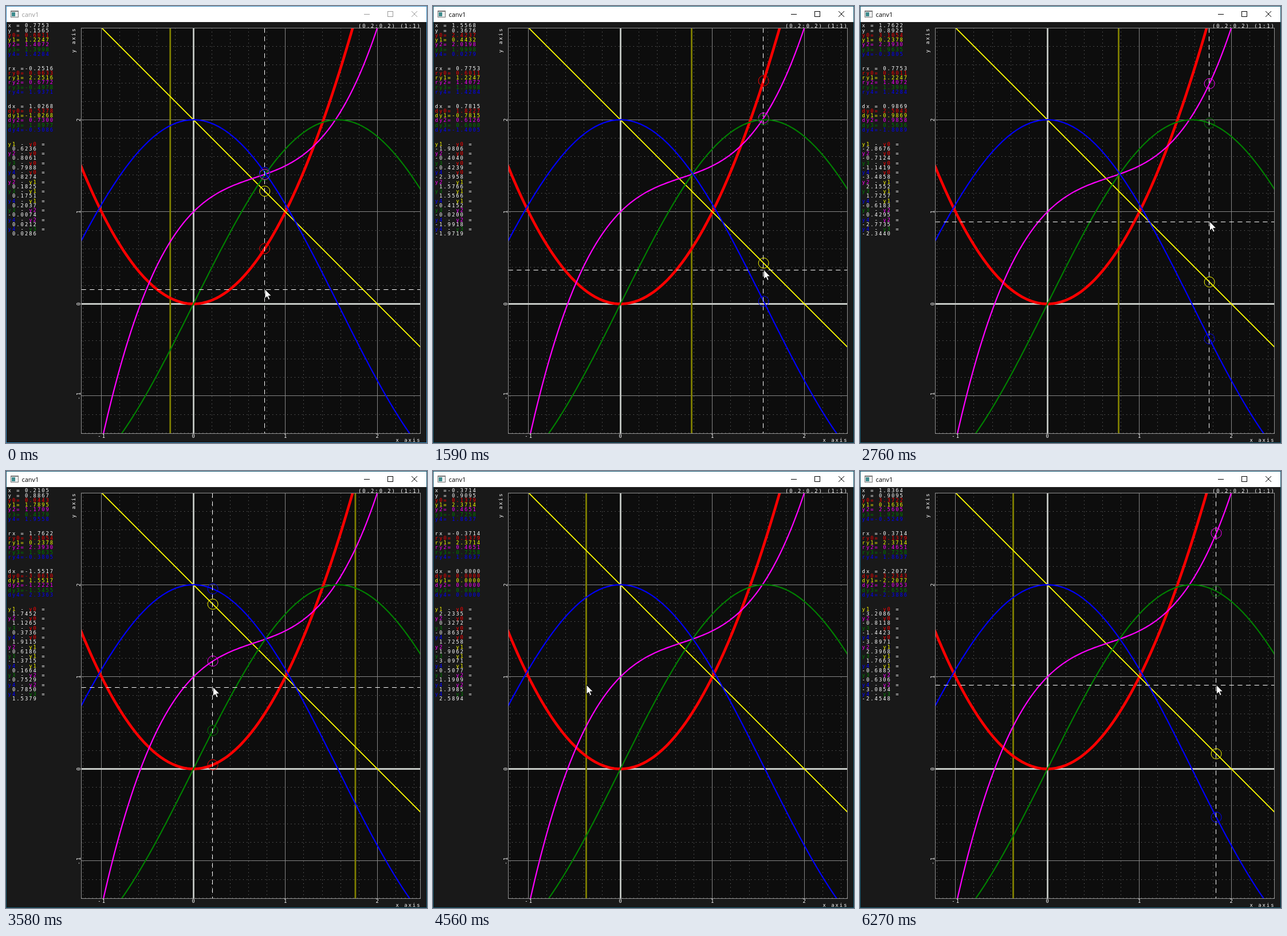
An HTML page with a canvas that plays this animation: 735x762 px, repeating every 7250 ms.

```html
<!DOCTYPE html>
<html lang="en">
<head>
<meta charset="utf-8">
<title>canv1</title>
<style>
  html, body { margin: 0; width: 100%; height: 100%; overflow: hidden; background: #191919; }
  canvas { display: block; width: 735px; height: 762px; }
</style>
</head>
<body>
<canvas id="stage" width="735" height="762"></canvas>
<script>
const ctx = document.getElementById('stage').getContext('2d');
const LOOP = 7250;
const PLOT = { left: 131.5, top: 38.5, right: 724, bottom: 745 };
const ORIGIN = { x: 327.3, y: 519.4 };
const UNIT = 160.5;
const CELL = 0.0057047;   // plot units per mouse step
const CHAR = 7.33, ROW = 8.25;

const curves = [
  { f: x => x * x, color: '#ff0000', width: 4.6 },
  { f: x => 2 - x, color: '#ffff00', width: 1.8 },
  { f: x => x ** 3 / 2 - x * x + x + 1, color: '#ff00ff', width: 2.2 },
  { f: x => 2 * Math.sin(x), color: '#008000', width: 2.2 },
  { f: x => 2 * Math.cos(x), color: '#0000ff', width: 2.2 }
];

// time, mouse column, mouse row, easing power (positive: in, negative: out)
const path = [
  [0, 136, 27, 1], [1230, 136, 27, 1],
  [1590, 273, 64, 1.2], [2100, 340, 140, -1.5], [2280, 340, 140, 1],
  [2760, 309, 156, -1], [3250, 309, 156, 1],
  [3580, 37, 155, 1.3], [4140, -65, 159, -2], [5070, -65, 159, 1],
  [5580, 41, 155, 2], [6270, 322, 159, -1.5], [LOOP, 322, 159, 1]
];
const marks = [[0, -44], [900, 136], [3120, 309], [4560, -65]];
const hidden = [[870, 1280], [3070, 3300], [4510, 5120]];
const ACTIVATE = 820;

const toX = column => column * CELL - 0.00055;
const toY = row => row * CELL + 0.0025;
const px = x => ORIGIN.x + x * UNIT;
const py = y => ORIGIN.y - y * UNIT;
const snap = v => Math.floor(v) + 0.5;
const number = v => v.toFixed(4).padStart(7);

function mouseAt(t) {
  const i = Math.max(1, path.findIndex(k => k[0] > t));
  const [t0, c0, r0] = path[i - 1], [t1, c1, r1, power] = path[i];
  const steps = Math.round((t1 - t0) / 48);
  const u = Math.floor((t - t0) / (t1 - t0) * steps + 1e-6) / steps;
  const e = power > 0 ? u ** power : 1 - (1 - u) ** -power;
  const mix = (a, b) => Math.round(a + (b - a) * e);
  return { x: toX(mix(c0, c1)), y: toY(mix(r0, r1)) };
}

function line(x0, y0, x1, y1, color, width = 1, dash = []) {
  ctx.strokeStyle = color;
  ctx.lineWidth = width;
  ctx.setLineDash(dash);
  ctx.beginPath();
  ctx.moveTo(x0, y0);
  ctx.lineTo(x1, y1);
  ctx.stroke();
  ctx.setLineDash([]);
}
const vertical = (x, ...style) => line(x, PLOT.top, x, PLOT.bottom, ...style);
const horizontal = (y, ...style) => line(PLOT.left, y, PLOT.right, y, ...style);

function mono(text, x, y, color = '#fff') {
  ctx.font = '8.8px "DejaVu Sans Mono", monospace';
  ctx.letterSpacing = (CHAR - 5.3) + 'px';
  ctx.fillStyle = color;
  ctx.fillText(text, x, y);
  ctx.letterSpacing = '0px';
}

function monoUp(text, x, y) {
  ctx.save();
  ctx.translate(x, y);
  ctx.rotate(-Math.PI / 2);
  mono(text, 0, 0);
  ctx.restore();
}

function drawWindow(active) {
  const ink = active ? '#000' : '#999';
  ctx.fillStyle = '#191919';
  ctx.fillRect(0, 0, 735, 762);
  ctx.fillStyle = '#fff';
  ctx.fillRect(0, 0, 735, 28);
  ctx.strokeStyle = active ? '#155a72' : '#3a8cc0';
  ctx.lineWidth = 1;
  ctx.strokeRect(0.5, 0.5, 734, 761);

  ctx.fillStyle = '#777';
  ctx.fillRect(8, 8, 14, 12);
  ctx.fillStyle = '#eee';
  ctx.fillRect(9, 10, 12, 9);
  ctx.fillStyle = '#3c8a8c';
  ctx.fillRect(10, 11, 6, 7);

  ctx.font = '11px "Open Sans", sans-serif';
  ctx.fillStyle = ink;
  ctx.fillText('canv1', 27.5, 18.5);

  line(625, 14.5, 635, 14.5, ink);
  ctx.strokeRect(666.5, 9.5, 9, 9);
  line(708, 9, 718, 19, ink);
  line(718, 9, 708, 19, ink);
}

function drawGrid() {
  ctx.fillStyle = '#0d0d0d';
  ctx.fillRect(PLOT.left, PLOT.top, PLOT.right - PLOT.left, PLOT.bottom - PLOT.top);
  const dots = [1, 5.42];
  for (let i = -7; i <= 14; i++) {
    const x = snap(px(i / 5)), y = snap(py(i / 5));
    if (i % 5 === 0) continue;
    if (x < PLOT.right) vertical(x, '#808080', 1, dots);
    if (y < PLOT.bottom) horizontal(y, '#808080', 1, dots);
  }
  for (const i of [-1, 1, 2]) {
    vertical(snap(px(i)), '#868686');
    horizontal(snap(py(i)), '#868686');
  }
  vertical(ORIGIN.x + 0.2, '#c4c8c4', 2.8);
  horizontal(ORIGIN.y + 0.1, '#c4c8c4', 2.8);
}

function drawCurves() {
  for (const { f, color, width } of curves) {
    ctx.strokeStyle = color;
    ctx.lineWidth = width;
    ctx.beginPath();
    for (let x = PLOT.left - 3; x <= PLOT.right + 3; x += 2) {
      ctx.lineTo(x, py(f((x - ORIGIN.x) / UNIT)));
    }
    ctx.stroke();
  }
}

function drawCrosshair({ x, y }) {
  const dash = [8.24, 6.42];
  vertical(snap(px(x) - 0.3), '#fff', 1, dash);
  horizontal(snap(py(y)), '#fff', 1, dash);
  for (const { f, color } of curves) {
    ctx.strokeStyle = color;
    ctx.lineWidth = 1;
    ctx.beginPath();
    ctx.arc(px(x), py(f(x)), 9, 0, 2 * Math.PI);
    ctx.stroke();
  }
}

function drawLabels() {
  ctx.strokeStyle = '#909090';
  ctx.lineWidth = 1;
  ctx.strokeRect(PLOT.left, PLOT.top, 592, 707);
  mono('(0.2:0.2) (1:1)', 615, 37.5);
  mono('x axis', 680.5, 760);
  monoUp('y axis', 121, 81.5);
  for (let i = -1; i <= 2; i++) {
    const half = i < 0 ? 6.5 : 2.8;
    mono(String(i), px(i) - half, 753);
    monoUp(String(i), 130, py(i) + half);
  }
}

function drawReadout(mouse, refX) {
  const put = (text, column, row, color) =>
    mono(text, 3.6 + column * CHAR, 37.3 + row * ROW, color);

  put('x =' + number(mouse.x), 0, 0);
  put('y =' + number(mouse.y), 0, 1);
  put('rx =' + number(refX), 0, 9);
  put('dx =' + number(mouse.x - refX), 0, 17);
  curves.forEach(({ f, color }, i) => {
    const now = f(mouse.x), ref = f(refX);
    put(`y${i}=` + number(now), 0, 2 + i, color);
    put(`ry${i}=` + number(ref), 0, 10 + i, color);
    put(`dy${i}=` + number(now - ref), 0, 18 + i, color);
  });

  let row = 25;
  for (let b = 0; b < curves.length; b++) {
    for (let a = b + 1; a < curves.length; a++) {
      put('y' + a, 0, row, curves[a].color);
      put('-', 3, row);
      put('y' + b, 5, row, curves[b].color);
      put('=', 8, row);
      put(number(curves[a].f(mouse.x) - curves[b].f(mouse.x)), 0, row + 1);
      row += 2;
    }
  }
}

function drawPointer({ x, y }) {
  ctx.save();
  ctx.translate(px(x) + 0.3, py(y) - 0.5);
  const arrow = new Path2D('M0 0V16.2L3.8 12.8L6.3 18.5L8.8 17.4L6.3 11.8H11.4Z');
  ctx.fillStyle = '#fff';
  ctx.strokeStyle = '#000';
  ctx.lineWidth = 0.9;
  ctx.fill(arrow);
  ctx.stroke(arrow);
  ctx.restore();
}

function draw(t) {
  const mouse = mouseAt(t);
  const refX = toX(marks.filter(m => m[0] <= t).pop()[1]);
  const crosshair = !hidden.some(([from, to]) => t >= from && t < to);

  drawWindow(t >= ACTIVATE);
  ctx.save();
  ctx.beginPath();
  ctx.rect(PLOT.left, PLOT.top, PLOT.right - PLOT.left, PLOT.bottom - PLOT.top);
  ctx.clip();
  drawGrid();
  vertical(px(refX) - 0.2, '#808000', 2.8);
  drawCurves();
  if (crosshair) drawCrosshair(mouse);
  ctx.restore();
  drawLabels();
  drawReadout(mouse, refX);
  drawPointer(mouse);
}

function tick() {
  draw(performance.now() % LOOP);
  requestAnimationFrame(tick);
}
tick();
</script>
</body>
</html>
```
